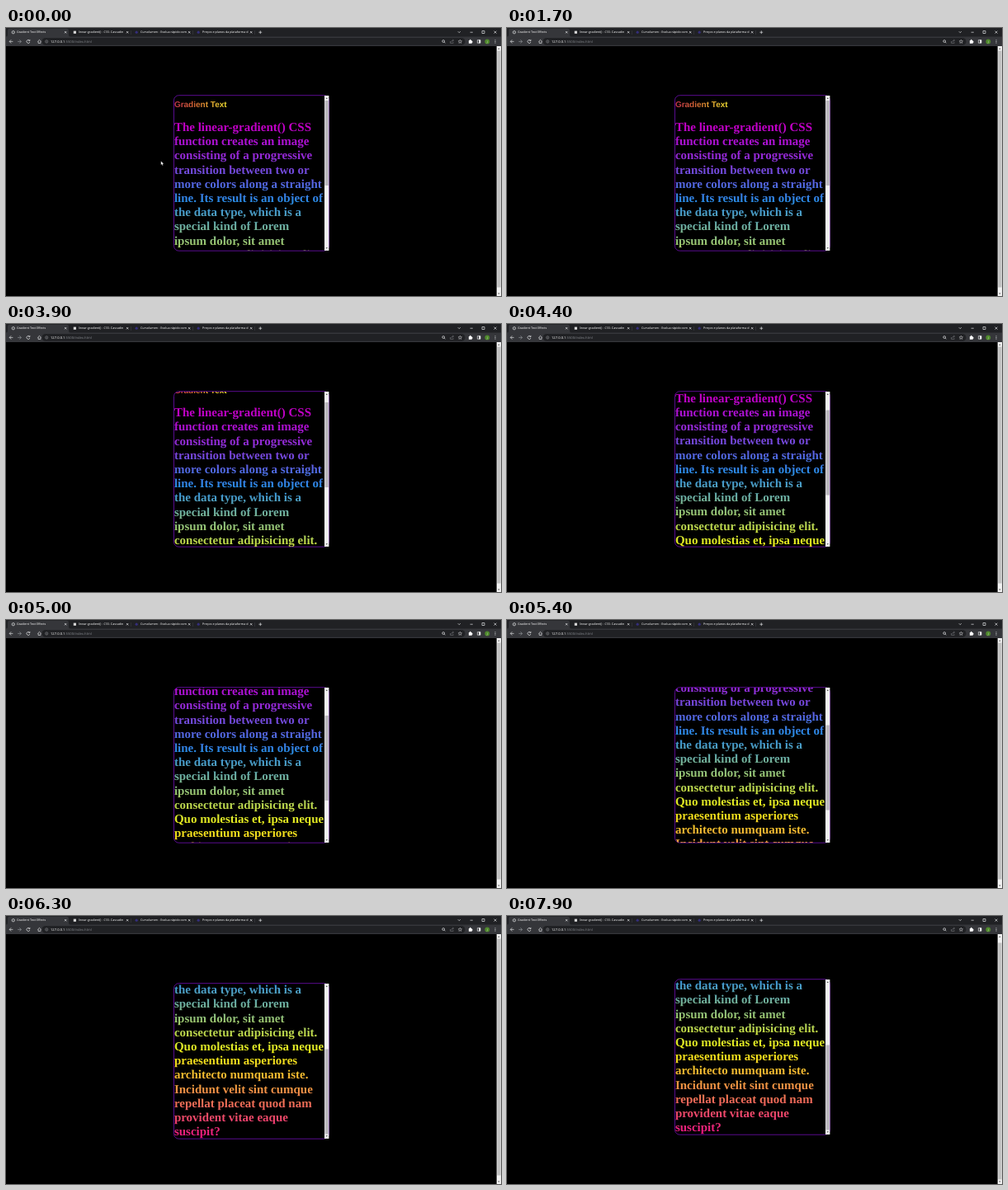
Write an HTML page that moves like this. It is 600 px wide and 325 px high and loops after 8 s.

```html
<!DOCTYPE html>
<html lang="en">
<head>
<meta charset="utf-8">
<title>Gradient Text Effects</title>
<style>
  html, body { margin: 0; width: 100%; height: 100%; overflow: hidden; background: #000; }
  svg { display: block; width: 600px; height: 325px; }
  text { text-rendering: geometricPrecision; white-space: pre; }
  .ui { font-family: "Open Sans", "Noto Sans", sans-serif; font-weight: 500; fill: #fff; }
  .tab { font-size: 3.7px; }
  .url { font-size: 4.13px; }
  .title { font: bold 10px "Liberation Sans", Arial, sans-serif; fill: url(#warm); }
  .body { font: bold 15px "Liberation Serif", "Times New Roman", serif; fill: url(#rainbow); }
  .line { fill: none; stroke: #eceef0; stroke-width: .65; }
  .thin { stroke-width: .45; }
  .soft { stroke: #9a9da1; }
  .faint { stroke: #4a4d51; stroke-width: .4; }
</style>
</head>
<body>
<svg viewBox="0 0 600 325">
  <defs>
    <linearGradient id="warm" gradientUnits="userSpaceOnUse" x1="204" y1="0" x2="268" y2="0">
      <stop offset="0" stop-color="#cc3650"/>
      <stop offset=".4" stop-color="#dc6c34"/>
      <stop offset=".65" stop-color="#eaa634"/>
      <stop offset=".95" stop-color="#f8e034"/>
    </linearGradient>
    <linearGradient id="rainbow" gradientUnits="userSpaceOnUse" x1="0" y1="111" x2="0" y2="403.4">
      <stop offset=".03" stop-color="#cc00d0"/>
      <stop offset=".1" stop-color="#b414e0"/>
      <stop offset=".18" stop-color="#8f3ae4"/>
      <stop offset=".34" stop-color="#2c94f4"/>
      <stop offset=".65" stop-color="#ffff14"/>
      <stop offset="1" stop-color="#f8148c"/>
    </linearGradient>
    <clipPath id="pageClip"><rect y="22" width="595" height="303"/></clipPath>
    <clipPath id="boxClip"><path d="M386 82H210Q204 82 204 88V264Q204 270 210 270H386Z"/></clipPath>
  </defs>

  <rect width="600" height="325"/>

  <g clip-path="url(#pageClip)">
    <g id="page">
      <rect x="203.5" y="81.7" width="187.9" height="188.5" rx="6" fill="none" stroke="#7010b4" stroke-width=".8"/>
      <g clip-path="url(#boxClip)"><g id="content" opacity=".95">
        <text class="title" x="203.9" y="96.4">Gradient Text</text>
      </g></g>
      <rect x="386" y="82" width="5.4" height="188" fill="#f1f1f1"/>
      <path d="M387.5 86l1.2-1.4 1.2 1.4zM387.5 266.3l1.2 1.4 1.2-1.4z" fill="#505050"/>
      <rect id="thumb" x="386.5" y="88" width="4.4" height="103" fill="#bbb8be"/>
    </g>
  </g>

  <!-- page scrollbar -->
  <rect x="594.7" y="22" width="5.3" height="303" fill="#f1f1f1"/>
  <path d="M596.1 25.7l1.2-1.4 1.2 1.4zM596.1 321.6l1.2 1.4 1.2-1.4z" fill="#505050"/>
  <rect id="pageThumb" x="595.2" y="27.5" width="4.4" height="287" fill="#c1c1c1"/>

  <!-- browser bars -->
  <rect width="600" height="11" fill="#202124"/>
  <path d="M0 10.5Q2 10.5 2 8.5V3Q2 .8 4.2 .8H73.8Q76 .8 76 3V8.5Q76 10.5 78 10.5H600V22H0Z" fill="#35363a"/>
  <rect x="43.5" y="12" width="513" height="8.8" rx="4.4" fill="#202124"/>
  <g id="tabs" class="ui tab"></g>
  <circle cx="8.8" cy="5.2" r="1.7" class="line"/>
  <path class="line thin soft" d="M7.2 5.2h3.2"/>
  <rect x="81.8" y="3.6" width="3.2" height="3.2" fill="#d8d8d8"/>
  <circle cx="158.2" cy="5.2" r="1.6" fill="#342e7c"/>
  <circle cx="233.2" cy="5.2" r="1.6" fill="#342e7c"/>
  <path class="line faint" d="M151.5 3v5M226.5 3v5M301.5 3v5"/>
  <path class="line" d="M306.4 5.2h3.8M308.3 3.3v3.8"/>
  <path class="line" d="M547.8 4.2l1.5 1.5 1.5-1.5M562.6 5.2h3.2M577 3.5h3v3h-3zM591.5 3.6l3 3M594.5 3.6l-3 3"/>
  <path class="line" d="M8.4 16.4H4.2M6.2 14.3l-2 2.1 2 2.1"/>
  <path class="line soft" d="M14.2 16.4h4.2M16.4 14.3l2 2.1-2 2.1"/>
  <path class="line" d="M28.6 15.2A2 2 0 1 0 28.9 17M28.9 13.9v1.7h-1.7"/>
  <path class="line" d="M38.4 16.4l2.1-2.1 2.1 2.1M39.1 16v2.4h2.8V16"/>
  <circle cx="49.2" cy="16.4" r="1.7" class="line thin soft"/>
  <path class="line thin" d="M49.2 16.2v1.2M49.2 15.2v.4"/>
  <text class="ui url" x="54" y="17.8">127.0.0.1<tspan fill="#868a8f">:5500/index.html</tspan></text>
  <g class="line">
    <circle cx="530.2" cy="16" r="1.4"/>
    <path d="M531.2 17l1.2 1.3"/>
    <path class="line thin soft" d="M538.6 16v2.3h3.6v-1M539.8 16.8q.3-1.8 2.4-1.8M541.4 14l1.2 1-1.2 1"/>
    <path class="line thin" d="M550.4 14.2l.6 1.5 1.6.1-1.2 1 .4 1.6-1.4-.9-1.4.9.4-1.6-1.2-1 1.6-.1z"/>
    <path d="M571.4 14.6h3.6v3.6h-3.6z"/>
  </g>
  <path d="M573.3 14.6h1.7v3.6h-1.7z" fill="#fff"/>
  <path d="M560.9 15h1.1q0-1.2.8-1.2t.8 1.2h1.1v1.1q1 0 1 .8t-1 .8v1h-3.8z" fill="#fff"/>
  <circle cx="583.3" cy="16.4" r="2.9" fill="#4f8a2c"/>
  <text class="ui" x="583.3" y="17.7" font-size="3.5" text-anchor="middle">J</text>
  <g fill="#eceef0"><circle cx="593" cy="14.7" r=".5"/><circle cx="593" cy="16.4" r=".5"/><circle cx="593" cy="18.1" r=".5"/></g>

  <path id="cursor" d="M187.8 161.4v4.7l1.1-1 .7 1.6.8-.3-.7-1.6h1.5z" fill="#fff" stroke="#222" stroke-width=".2"/>
</svg>
<script>
const NS = "http://www.w3.org/2000/svg";
const $ = id => document.getElementById(id);

function add(parent, tag, attrs, text = "") {
  const el = document.createElementNS(NS, tag);
  for (const key in attrs) el.setAttribute(key, attrs[key]);
  el.textContent = text;
  parent.append(el);
}

const paragraph = `The linear-gradient() CSS
function creates an image
consisting of a progressive
transition between two or
more colors along a straight
line. Its result is an object of
the data type, which is a
special kind of Lorem
ipsum dolor, sit amet
consectetur adipisicing elit.
Quo molestias et, ipsa neque
praesentium asperiores
architecto numquam iste.
Incidunt velit sint cumque
repellat placeat quod nam
provident vitae eaque
suscipit?`;
paragraph.split("\n").forEach((line, i) =>
  add($("content"), "text", { class: "body", x: 203.9, y: 125 + i * 17.2 }, line));

const tabs = [
  "Gradient Text Effects",
  "linear-gradient() - CSS: Cascadin",
  "Cursolumen - Evolua rápido com",
  "Preços e planos da plataforma d"
];
tabs.forEach((name, i) => {
  add($("tabs"), "text", { x: 13 + i * 75, y: 6.4 }, name);
  const x = 71 + i * 75;
  add($("tabs"), "rect", { x: x - .5, y: 3, width: 5, height: 5, fill: i ? "#202124" : "#35363a" });
  add($("tabs"), "path", { class: "line", d: `M${x} 4l2.4 2.4m0-2.4l-2.4 2.4` });
});

// [time in ms, offset in px]
const boxScroll = [[3680, 0], [3900, 12.8], [5000, 50.9], [5800, 93.3], [6300, 134]];
const pageScroll = [[6600, 0], [6800, 5]];

function at(track, t) {
  if (t <= track[0][0]) return track[0][1];
  for (let i = 1; i < track.length; i++) {
    const [t0, v0] = track[i - 1], [t1, v1] = track[i];
    if (t <= t1) return v0 + (v1 - v0) * (t - t0) / (t1 - t0);
  }
  return track[track.length - 1][1];
}

const shift = (id, y) => $(id).setAttribute("transform", `translate(0 ${y})`);

function draw(now) {
  const t = Math.floor(now % 8000 / 100) * 100;
  const inner = at(boxScroll, t), outer = at(pageScroll, t);
  shift("content", -inner);
  shift("thumb", inner * 73.5 / 134);
  shift("page", -outer);
  shift("pageThumb", outer);
  $("cursor").setAttribute("visibility", t < 900 ? "visible" : "hidden");
}

const start = performance.now();
function tick() {
  draw(performance.now() - start);
  requestAnimationFrame(tick);
}
tick();
</script>
</body>
</html>
```
